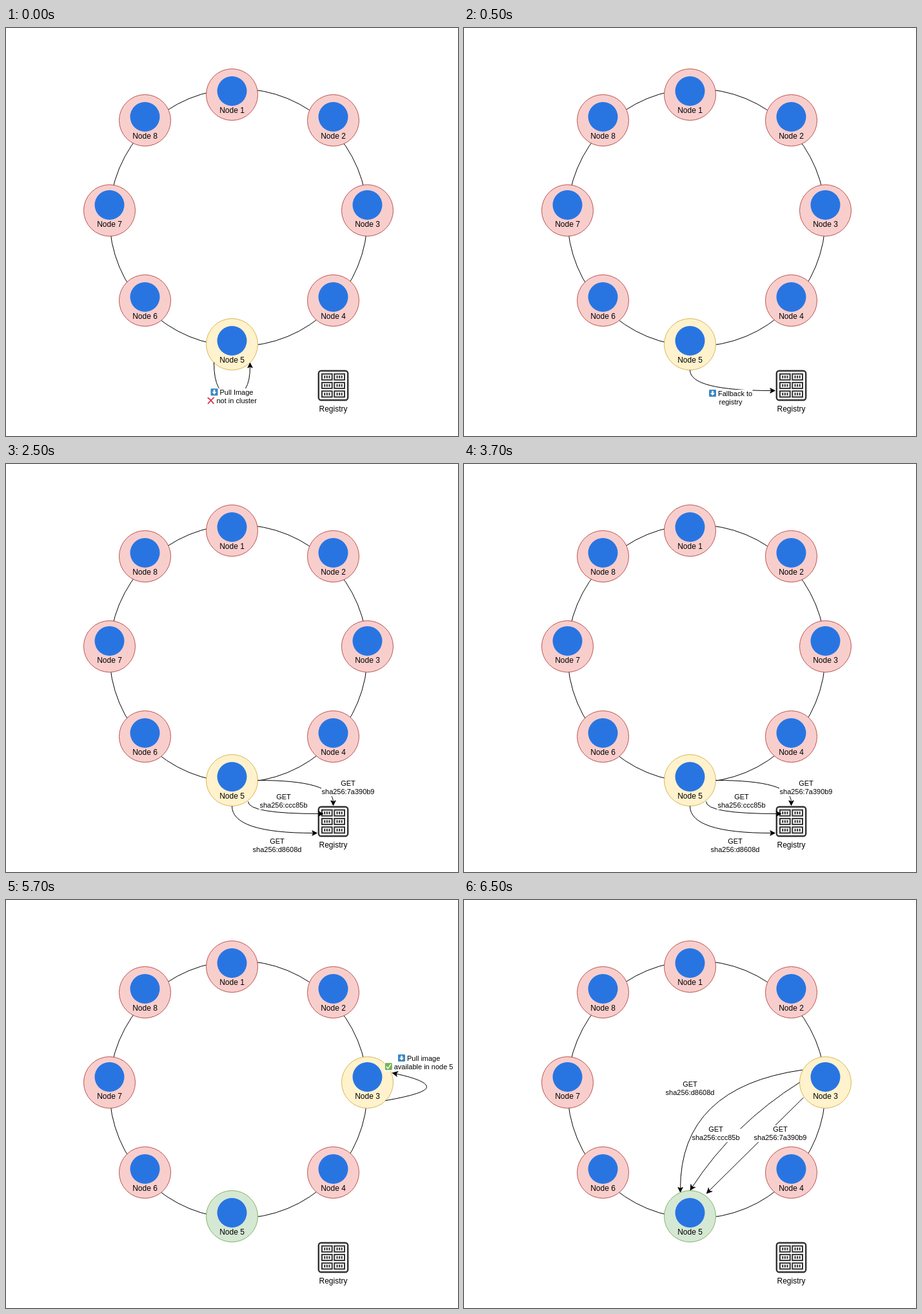
An HTML page that plays this animation: 701x634 px, repeating every 8 s.

```html
<!DOCTYPE html>
<html lang="en">
<head>
<meta charset="utf-8">
<title>Image pull in a node ring</title>
<style>
  html, body { margin: 0; width: 100%; height: 100%; overflow: hidden; background: #fff; }
  svg { display: block; }
  text { font: 11px "Liberation Sans", Arial, sans-serif; }
  .name { font-size: 12px; text-anchor: middle; }
  .mid { text-anchor: middle; }
  .line { fill: none; stroke: #000; }
</style>
</head>
<body>
<svg id="stage" width="701" height="634" viewBox="0 0 701 634"></svg>
<script>
const LOOP = 8000;
const STARTS = [0, 500, 2500, 4500, 6500];
const RED = ['#f8cecc', '#b85450'];
const YELLOW = ['#fff2cc', '#d6b656'];
const GREEN = ['#d5e8d4', '#82b366'];
// x, y, vertical shift of the contents
const NODES = [
  [350.5, 103.5, 0], [507.5, 143.5, 0], [560.5, 283.5, -3], [507.5, 423.5, 0],
  [350.5, 491.5, 0], [215.5, 423.5, 0], [160.5, 283.5, -3], [215.5, 143.5, 0]
];

const text = (x, y, s, cls = '') => `<text x="${x}" y="${y}" class="${cls}">${s}</text>`;
const rect = (x, y, w, h, attrs) => `<rect x="${x}" y="${y}" width="${w}" height="${h}" ${attrs}/>`;
const blank = (x, y, w, h) => rect(x, y, w, h, 'fill="#fff"');

function node([x, y, shift], i) {
  return `<circle class="node" cx="${x}" cy="${y}" r="40"/>
    <circle cx="${x}" cy="${y - 5.5 + shift}" r="23" fill="#2875e2"/>` +
    text(x, y + 28.5 + shift, `Node ${i + 1}`, 'name');
}

function registry() {
  let s = rect(484.8, 532.8, 45.4, 45.4, 'rx="4" fill="#fff" stroke="#333" stroke-width="2.4"');
  for (const x of [490, 509.3]) {
    for (const y of [537.6, 550.9, 564.2]) {
      s += rect(x, y, 15.7, 9.2, 'fill="none" stroke="#333" stroke-width="2"');
      for (let k = 0; k < 3; k++) s += rect(x + 3.2 + k * 3.6, y + 2.5, 2.1, 4.2, 'fill="#333"');
    }
  }
  return s + text(507.5, 596, 'Registry', 'name');
}

// Curve ending in an arrowhead at (x, y) that points along angle (degrees)
function arrow(path, x, y, angle) {
  return `<path class="line" d="${path}"/>
    <path d="M0 0L-7.5 3.7L-5.6 0L-7.5 -3.7Z" stroke="#000" stroke-linejoin="miter"
      transform="translate(${x} ${y}) rotate(${angle})"/>`;
}

const icon = (x, y, body) => `<g transform="translate(${x} ${y})">${body}</g>`;
const tile = color => rect(0, 0, 11, 11, `rx="1.2" fill="${color}"`);
const down = (x, y) => icon(x, y, tile('#3b88c3') +
  '<path d="M4.2 2H6.8V5.3H9L5.5 9.2L2 5.3H4.2Z" fill="#fff"/>');
const check = (x, y) => icon(x, y, tile('#77b255') +
  '<path d="M2.3 6L4.6 8.5L8.7 2.4" fill="none" stroke="#fff" stroke-width="1.5" stroke-linecap="round"/>');
const cross = (x, y) => icon(x, y,
  '<path d="M1 1.2Q6 4.5 9.5 10M10 .8Q5 5 1.2 10" fill="none" stroke="#dd2e44" stroke-width="1.7" stroke-linecap="round"/>');

// Two-line request label with a white backing
function get(x, y, hash, w) {
  return blank(x - w / 2, y - 10, w, 26) +
    text(x, y, 'GET', 'mid') + text(x, y + 13, 'sha256:' + hash, 'mid');
}

const SCENES = [
  arrow('M322.5 519.5Q322.5 571.5 350.5 571.5Q378.5 571.5 378.5 526', 378.5, 520.5, -90) +
    blank(312, 560, 78, 27) +
    down(317.5, 560.3) + text(331.5, 570, 'Pull Image') +
    cross(312.3, 573.5) + text(326.5, 583, 'not in cluster'),

  arrow('M350.5 531.5Q350.5 563.5 477 563.5', 482.3, 563.5, 0) +
    blank(379.5, 562, 68, 26) +
    down(380, 562) + text(394, 572, 'Fallback to') + text(413.5, 585, 'registry', 'mid'),

  arrow('M390.5 491.5Q507.5 491.5 507.5 525.5', 507.5, 530.5, 90) +
    arrow('M375.5 524.5Q375.5 543.5 487 543.5', 492, 543.5, 0) +
    arrow('M350.5 531.5Q350.5 573.5 477 573.5', 482.3, 573.5, 0) +
    get(530.5, 500, '7a390b9', 83) + get(430.5, 521, 'ccc85b', 76) + get(420.5, 590, 'd8608d', 77),

  arrow('M588.5 311.7Q652.5 300.5 652.5 290.5Q652.5 280.5 605 270', 599.5, 268.7, 192.5) +
    blank(587, 240, 107, 26) +
    down(608, 240) + text(622, 250, 'Pull image') +
    check(587.8, 253.3) + text(601.7, 263, 'available in node 5'),

  arrow('M520.5 283.5Q418 348 354 446', 351, 450.7, 122.5) +
    arrow('M526.5 307L380 452', 376.5, 455.7, 135) +
    get(350.5, 290, 'd8608d', 77) + get(390.5, 360, 'ccc85b', 76) + get(490.5, 360, '7a390b9', 83) +
    arrow('M525 264Q335.5 291 335.5 449', 335.5, 454, 90)
];

const stage = document.getElementById('stage');
stage.innerHTML = '<circle class="line" cx="360.5" cy="294.5" r="200"/>' +
  NODES.map(node).join('') + registry() +
  SCENES.map(s => `<g class="scene">${s}</g>`).join('');
const circles = stage.querySelectorAll('.node');
const groups = stage.querySelectorAll('.scene');

function paint(i, [fill, stroke]) {
  circles[i].setAttribute('fill', fill);
  circles[i].setAttribute('stroke', stroke);
}

function draw() {
  const t = performance.now() % LOOP;
  const scene = STARTS.filter(s => s <= t).length - 1;
  const pulled = scene > 2;
  groups.forEach((g, i) => g.style.display = i === scene ? '' : 'none');
  circles.forEach((c, i) => paint(i, RED));
  paint(2, pulled ? YELLOW : RED);
  paint(4, pulled ? GREEN : YELLOW);
  requestAnimationFrame(draw);
}
draw();
</script>
</body>
</html>
```
